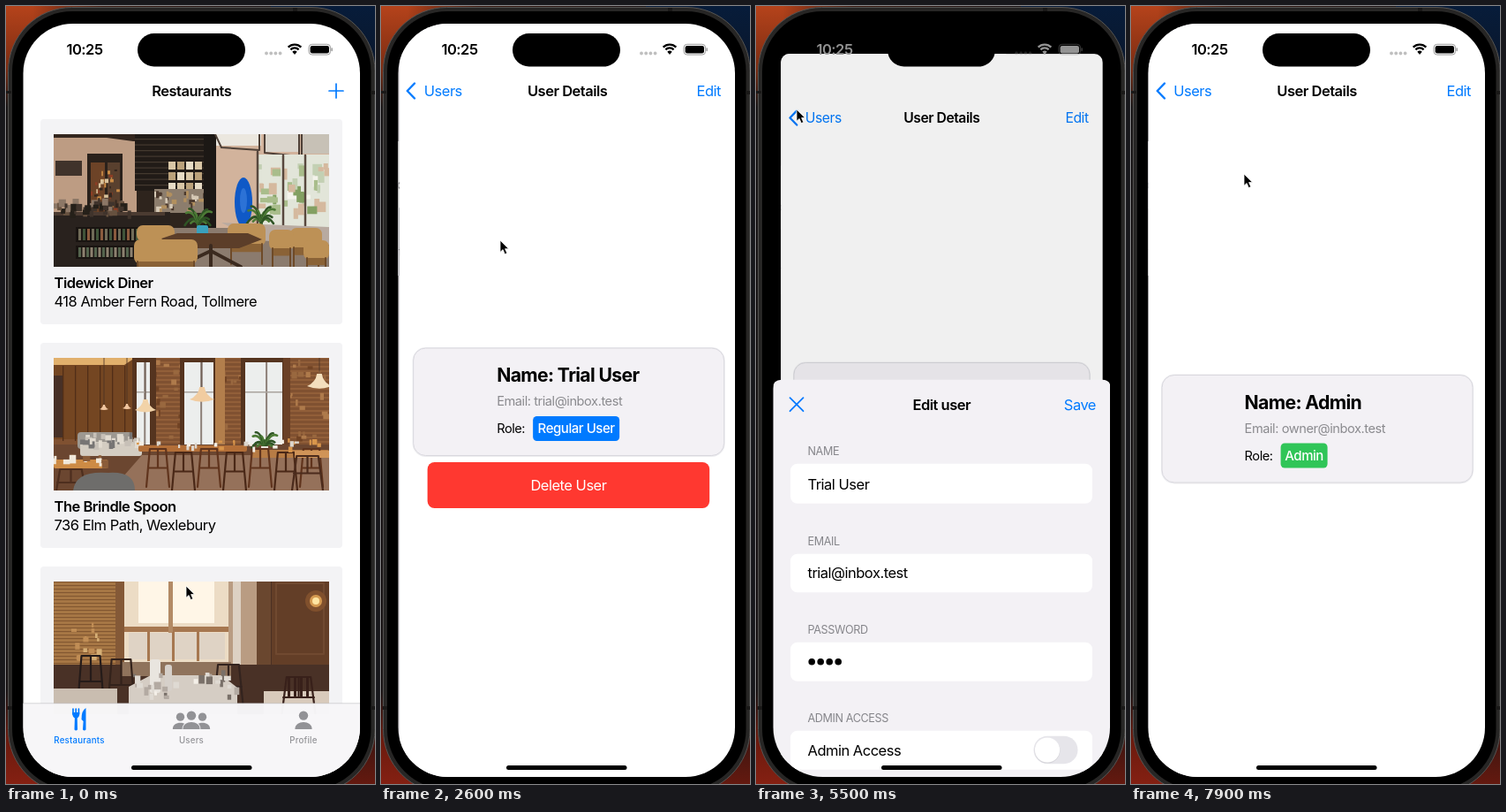
An HTML page that plays this animation: 418 by 880 pixels, repeating every 8 s.

```html
<!DOCTYPE html>
<html lang="en">
<head>
<meta charset="utf-8">
<title>Restaurant admin app</title>
<style>
  html, body { margin: 0; width: 100%; height: 100%; overflow: hidden; background: #000; }
  svg { display: block; width: 418px; height: 880px; }
  text { font-family: Inter, "Open Sans", sans-serif; letter-spacing: -0.03em; white-space: pre; }
  .tab text { letter-spacing: 0.02em; }
</style>
</head>
<body>
<svg id="stage" viewBox="0 0 418 880" xmlns="http://www.w3.org/2000/svg"></svg>
<script>
const LOOP = 8000, STEP = 100;
const BLUE = '#007aff', GRAY = '#8a8a8e', PALE = '#f3f1f5';
const GUEST = { name: 'Trial User', email: 'trial@inbox.test', role: 'Regular User' };
const ADMIN = { name: 'Admin', email: 'owner@inbox.test', role: 'Admin' };

// Markup helpers
const rect = (x, y, w, h, fill, r = 0, more = '') =>
  `<rect x="${x}" y="${y}" width="${w}" height="${h}" rx="${r}" fill="${fill}" ${more}/>`;
const circle = (x, y, r, fill) => `<circle cx="${x}" cy="${y}" r="${r}" fill="${fill}"/>`;
const oval = (x, y, rx, ry, fill) => `<ellipse cx="${x}" cy="${y}" rx="${rx}" ry="${ry}" fill="${fill}"/>`;
const shape = (d, fill) => `<path d="${d}" fill="${fill}"/>`;
const line = (d, color, w, cap = 'round') =>
  `<path d="${d}" fill="none" stroke="${color}" stroke-width="${w}" stroke-linecap="${cap}" stroke-linejoin="${cap === 'round' ? 'round' : 'miter'}"/>`;
const group = (id, body, more = '') => `<g id="${id}" ${more}>${body}</g>`;
const text = (x, y, s, { size = 16.5, weight = 400, fill = '#000', anchor = 'start' } = {}) =>
  `<text x="${x}" y="${y}" font-size="${size}" font-weight="${weight}" fill="${fill}" text-anchor="${anchor}">${s}</text>`;
const title = (s, y = 102) => text(210.3, y, s, { weight: 600, anchor: 'middle' });
const repeat = (n, f) => Array.from({ length: n }, (_, i) => f(i)).join('');

function seeded(seed) {
  return () => (seed = (seed * 16807) % 2147483647) / 2147483647;
}
function scatter(seed, n, x, y, w, h, size, colors) {
  const rnd = seeded(seed);
  return repeat(n, () => rect((x + rnd() * w).toFixed(1), (y + rnd() * h).toFixed(1),
    (size * (0.4 + rnd())).toFixed(1), (size * (0.6 + rnd())).toFixed(1), colors[Math.floor(rnd() * colors.length)]));
}

// Photos, each 312 x 150
const chair = (x, y, w, h, color) =>
  line(`M${x} ${y + h}L${x + w * 0.15} ${y}H${x + w * 0.85}L${x + w} ${y + h}M${x + 2} ${y + h * 0.5}H${x + w - 2}M${x + w / 2} ${y}V${y + h * 0.5}`, color, 2.2);
const armchair = (x, y, w, h) => rect(x, y, w, h * 0.55, '#bd9156', 7) +
  rect(x + 3, y + h * 0.5, w - 6, h * 0.2, '#8a6236', 3) +
  line(`M${x + 4} ${y + h * 0.5}V${y + h}M${x + w - 4} ${y + h * 0.5}V${y + h}`, '#6e4a28', 2);
const plant = (x, y, s) => repeat(13, i => {
  const a = Math.PI * (1 + i / 12), r = s * (0.7 + 0.3 * Math.sin(i * 5));
  return line(`M${x} ${y}Q${x + r * 0.4 * Math.cos(a)} ${y - r * 0.9} ${x + r * Math.cos(a)} ${y + r * Math.sin(a)}`, i % 2 ? '#4c7a35' : '#2f5425', 2.6);
});
const lamp = (x, y, s, color) => line(`M${x} 0V${y}`, '#473224', 0.8) +
  shape(`M${x - s * 0.2} ${y - s}H${x + s * 0.2}Q${x + s * 0.3} ${y - s * 0.3} ${x + s} ${y}Q${x} ${y + s * 0.4} ${x - s} ${y}Q${x - s * 0.3} ${y - s * 0.3} ${x - s * 0.2} ${y - s}`, color);

const cafe = () => rect(0, 0, 312, 150, '#2e241d') +
  rect(0, 0, 94, 92, '#bd9c83') + shape('M0 0H180V8H90L60 4H0Z', '#33261e') +
  rect(38, 22, 40, 72, '#2a211b') + rect(42, 32, 16, 56, '#6d4327') + rect(61, 32, 14, 56, '#59402e') +
  scatter(7, 34, 42, 34, 30, 50, 3.5, ['#c98b45', '#8c3d24', '#d9c29b', '#33261e']) +
  rect(2, 30, 30, 17, '#40332b') + rect(92, 0, 90, 64, '#211b17') +
  repeat(9, i => rect(92, 5 + i * 6.5, 88, 1.2, '#453a30')) +
  repeat(12, i => rect(130 + i % 4 * 10, 31 + Math.floor(i / 4) * 12, 8, 9, ['#d8c6a6', '#bba27b', '#e7dcc6'][i % 3])) +
  rect(114, 62, 64, 27, '#8c7d6d') + scatter(8, 35, 114, 64, 58, 20, 5, ['#d5c8b5', '#4a382c', '#b2905f']) +
  rect(0, 88, 132, 62, '#29221e') + rect(0, 88, 126, 4, '#4b3b31') + scatter(3, 45, 0, 72, 85, 16, 6, ['#40342c', '#252019', '#8c7766', '#66513f']) +
  rect(25, 105, 95, 17, '#191411') + rect(25, 126, 80, 15, '#191411') +
  repeat(17, i => rect(28 + i * 5, 107, 3, 13, ['#706b58', '#40543a', '#8a5b3e'][i % 3]) + rect(28 + i * 4.5, 128, 3, 11, ['#54634d', '#8d8170'][i % 2])) +
  rect(182, 0, 130, 110, '#d2b39c') + rect(170, 0, 14, 106, '#1c1815') +
  rect(184, 0, 51, 13, '#ebe7df') + rect(238, 0, 40, 20, '#dad5cc') + rect(281, 0, 31, 22, '#c7c1b6') +
  line('M183 0L190 15L233 18V0M239 0V21L278 25V0M281 0V25L312 28', '#4e4037', 2) +
  rect(231, 23, 81, 87, '#e2e5d9') + scatter(22, 42, 232, 32, 75, 52, 8, ['#a9bd8b', '#f4f3eb', '#c3d0b3', '#d5b99e', '#83a062']) +
  line('M231 20V105M260 24V110M285 24V110', '#58483e', 2.5) +
  shape('M120 106H312V150H100Z', '#8b7b6e') + shape('M190 100L312 105V125L230 120Z', '#b8aaa0') +
  oval(215, 77, 10, 28, '#0f59c6') + oval(215, 75, 4, 14, '#2c72d6') +
  plant(164, 103, 22) + rect(162, 103, 13, 14, '#39a1bd', 2) + plant(235, 101, 23) +
  rect(94, 103, 43, 18, '#bd9156', 7) + armchair(197, 101, 43, 46) + armchair(268, 106, 36, 44) + armchair(283, 120, 29, 40) + armchair(244, 108, 28, 42) +
  shape('M122 118L140 112H220L236 119L210 129H135Z', '#5c3e29') + line('M178 126V150M140 150L178 132L212 150', '#3b2a1f', 4) + armchair(91, 119, 72, 50);

const dining = () => rect(0, 0, 312, 150, '#805131') +
  repeat(22, i => line(`M92 ${i * 5}H312`, '#a36e43', 1.2)) + scatter(31, 100, 110, 0, 200, 92, 5, ['#99683f', '#714324', '#ae7a4b']) +
  rect(0, 0, 92, 92, '#744622') + shape('M0 0H92L80 8H0Z', '#e1b06c') + repeat(6, i => rect(10 + i * 14, 9, 1.3, 85, '#512e18')) +
  rect(0, 20, 10, 70, '#473026') +
  [[94, 15], [148, 33], [217, 42]].map(([x, w]) => rect(x - 5, 0, w + 12, 103, '#55341f') + rect(x, 5, w, 94, '#eceeed') +
    rect(x + w * 0.55, 5, 2, 94, '#8d8078') + rect(x, 38, w, 1.5, '#aaa49e')).join('') +
  rect(183, 0, 11, 105, '#b27e4c') + rect(260, 0, 8, 105, '#6a4026') +
  shape('M0 98H312V150H0Z', '#6b4630') + shape('M100 110H312V150H65Z', '#95715a') +
  rect(27, 84, 62, 19, '#9d9891', 4) + rect(30, 95, 70, 16, '#d4cdc2', 3) +
  scatter(5, 30, 30, 84, 65, 13, 6, ['#c7c0b7', '#777574', '#e2dbd0']) +
  lamp(57, 58, 5, '#f1c6a0') + lamp(83, 57, 5, '#f1c6a0') + lamp(104, 59, 12, '#f2d3a8') + lamp(168, 47, 14, '#f1cca0') + lamp(301, 32, 14, '#f4dfbd') +
  plant(239, 102, 21) + rect(235, 100, 8, 9, '#e7e2d9') +
  rect(96, 99, 123, 7, '#b36f38', 2) + rect(224, 104, 88, 9, '#b77c45', 2) +
  repeat(7, i => chair(105 + i * 29, 103 + i % 2 * 4, 26, 43, i % 2 ? '#4a2817' : '#60341d')) +
  scatter(11, 28, 94, 91, 215, 10, 4, ['#f3eee5', '#ddd6cd', '#d9964b']) +
  rect(0, 115, 61, 10, '#cd8b45', 2) + scatter(12, 12, 0, 109, 55, 8, 6, ['#f1e8da', '#8a5c39']) +
  chair(2, 126, 35, 30, '#4d2e1e') + shape('M22 150Q25 127 62 130Q92 128 92 150Z', '#6e6d6b') +
  rect(273, 105, 39, 8, '#d09458') + chair(270, 111, 35, 39, '#4b2b1c');

const bistro = () => rect(0, 0, 312, 150, '#4b3023') +
  rect(0, 0, 72, 108, '#a77745') + repeat(27, i => rect(0, i * 4, 72, 1.1, '#815630')) + scatter(9, 14, 20, 45, 30, 45, 5, ['#d5ae75', '#c08d55']) +
  rect(70, 0, 10, 118, '#845937') + rect(80, 0, 118, 92, '#ecdcc5') + rect(96, 0, 86, 47, '#fff6e7') +
  rect(80, 51, 118, 6, '#a67750') + rect(130, 0, 5, 88, '#b38a65') + rect(85, 58, 109, 30, '#dfd3c5') +
  repeat(3, i => rect(106 + i * 28, 57, 3, 33, '#a67750')) +
  rect(198, 0, 32, 125, '#b99c82') + rect(203, 0, 9, 125, '#ddd1c3') + rect(230, 0, 16, 118, '#6a472f') +
  rect(247, 0, 65, 108, '#633e27') + line('M252 2H306V82H252Z', '#704930', 2) +
  circle(297, 22, 12, '#80502d') + circle(297, 22, 7, '#d59a50') + circle(297, 22, 4, '#ffe5a2') +
  rect(0, 94, 312, 56, '#493126') + rect(77, 91, 124, 16, '#8f735c') +
  chair(27, 84, 30, 58, '#251b19') + chair(61, 88, 31, 58, '#33221b') + chair(181, 94, 34, 50, '#33231e') +
  shape('M85 119L110 106H190L208 120V150H85Z', '#d5cdc4') + rect(0, 121, 72, 29, '#c9bdb0') + rect(238, 124, 74, 26, '#d8cabb') +
  chair(258, 108, 39, 46, '#38201a') + repeat(4, i => rect(265 + i * 7, 109, 3, 22, '#38201a')) +
  rect(109, 88, 12, 38, '#e9e5df', 3) + rect(126, 94, 8, 30, '#d6d0ca', 3) +
  scatter(24, 30, 90, 100, 115, 29, 6, ['#f4efe8', '#b3aaa2', '#dfdad3', '#797069']);

const photo = (y, art) => `<svg x="54" y="${y}" width="312" height="150" viewBox="0 0 312 150">${art()}</svg>`;
const card = (y, art, name, address) => rect(39, y, 342, 232, '#f3f3f5', 4) + photo(y + 17, art) +
  text(54.5, y + 191, name, { weight: 600 }) + text(54.5, y + 212, address);

// Tab bar
const person = (x, s, c) => circle(x, 818 - 15.4 * s, 5.2 * s, c) +
  shape(`M${x - 9.6 * s} 818C${x - 10 * s} ${818 - 10.8 * s} ${x + 10 * s} ${818 - 10.8 * s} ${x + 9.6 * s} 818Z`, c);
const cutlery = c => line('M76 795V801M79.2 795V818M82.4 795V801', c, 1.7) +
  shape('M75.2 799H83.3Q83.5 804 80.7 805.5L81 818.5Q79.2 820.5 77.5 818.5L77.9 805.5Q75 804 75.2 799Z', c) +
  shape('M90.5 794V818.5Q88.8 820.5 87 818.5L87.6 809L85.5 807Q85.3 797 90.5 794Z', c);
function tabs(active) {
  const color = i => i === active ? BLUE : '#929296';
  const label = (x, s, i) => text(x, 834, s, { size: 9.7, weight: 500, fill: color(i), anchor: 'middle' });
  return `<g class="tab">${cutlery(color(0))}${person(197.5, 0.9, color(1))}${person(222.5, 0.9, color(1))}` +
    `<g stroke="#f4f3f7" stroke-width="1.6" paint-order="stroke">${person(210, 1, color(1))}</g>${person(337, 1, color(2))}` +
    label(83, 'Restaurants', 0) + label(210, 'Users', 1) + label(337, 'Profile', 2) + '</g>';
}

// Screens
const plus = line('M366 96H382M374 88V104', BLUE, 1.7);
const restaurants = rect(19, 20, 383, 853, '#fff') +
  card(128, cafe, 'Tidewick Diner', '418 Amber Fern Road, Tollmere') +
  card(381, dining, 'The Brindle Spoon', '736 Elm Path, Wexlebury') +
  card(634, bistro, '', '') +
  rect(19, 789, 383, 84, '#f7f6f8', 0, 'fill-opacity=".98"') + rect(19, 788.5, 383, 0.7, '#c4c4c6') +
  tabs(0) + title('Restaurants') + plus;

const userRow = (y, { name, email }) => text(58.5, y + 35, name, { weight: 600 }) +
  text(58.5, y + 53.5, email, { size: 14.5, fill: GRAY }) +
  line(`M355.5 ${y + 32.5}L360.8 ${y + 38}L355.5 ${y + 43.5}`, '#bfbfc3', 1.9);
const users = rect(19, 20, 383, 853, PALE) + rect(39, 153, 342, 152, '#fff', 9) +
  rect(39, 153, 342, 76, '#d1d1d6', 9, 'id="pressAdmin"') + rect(39, 229, 342, 76, '#d1d1d6', 9, 'id="pressGuest"') +
  rect(58, 228, 323, 0.8, '#d4d4d8') + userRow(153, ADMIN) + userRow(229, GUEST) +
  rect(299, 180, 45.5, 22, BLUE, 4) + text(321.7, 195.3, 'Admin', { size: 12.3, weight: 600, fill: '#fff', anchor: 'middle' }) +
  tabs(1) + rect(19, 20, 383, 853, '#000', 0, 'id="shade"');

const details = (user, x, y, pillW, color) => rect(19, 20, 383, 853, '#fff') +
  rect(33.5, y - 0.5, 354, 124, '#ededf0', 15) + rect(34.5, y + 0.5, 352, 121.5, PALE, 14, 'stroke="#d9d8de"') +
  text(x, y + 38.5, `Name: ${user.name}`, { size: 21.2, weight: 700 }) +
  text(x, y + 65.5, `Email: ${user.email}`, { size: 14.6, fill: GRAY }) +
  text(x, y + 96.8, 'Role:', { size: 14.6 }) +
  rect(x + 41, y + 77.5, pillW, 28, color, 4.5) +
  text(x + 41 + pillW / 2, y + 96.8, user.role, { size: 15, weight: 500, fill: '#fff', anchor: 'middle' });
const guestDetails = details(GUEST, 129, 386.5, 98, BLUE) + rect(50.5, 516, 319.5, 52, '#ff3830', 8) +
  text(210.3, 548.3, 'Delete User', { fill: '#fff', anchor: 'middle' });

const detailsNav = line('M38 87.5L29.8 96L38 104.5', BLUE, 2.4) +
  group('backLabel', text(48, 102, 'Users', { fill: BLUE })) +
  group('detailsTitle', title('User Details')) + text(385, 102, 'Edit', { fill: BLUE, anchor: 'end' });

const field = (label, y, h, body) => text(58.5, y - 10, label, { size: 12.6, fill: '#85858a' }) +
  rect(39, y, 342, h, '#fff', 8) + body;
const sheet = shape('M19 873V99Q19 89 29 89H392Q402 89 402 99V873Z', PALE) +
  line('M38.5 109.5L53.5 124.5M53.5 109.5L38.5 124.5', BLUE, 1.8) +
  title('Edit user', 123) + text(385, 123, 'Save', { fill: BLUE, anchor: 'end' }) +
  field('NAME', 184, 45, text(58.5, 213.5, GUEST.name)) +
  field('EMAIL', 286, 43.5, text(58.5, 313.5, GUEST.email)) +
  field('PASSWORD', 386, 44, repeat(4, i => circle(63.2 + i * 10, 408, 3.8, '#000'))) +
  field('ADMIN ACCESS', 486, 44, text(58.5, 514, 'Admin Access') +
    rect(314.5, 492, 50, 31.5, '#e6e5ea', 15.7) + circle(330, 508.5, 14.4, '#d6d5da') + circle(330, 507.8, 14.1, '#fff'));

const arc = r => line(`M${327 - r * 0.72} ${54 - r * 0.72}A${r} ${r} 0 0 1 ${327 + r * 0.72} ${54 - r * 0.72}`, 'currentColor', 2.3, 'butt');
const status = text(89, 55.3, '10:25', { weight: 600, fill: 'currentColor', anchor: 'middle' }) +
  `<g opacity=".25">${repeat(4, i => circle(295 + i * 5.2, 53.5, 1.9, 'currentColor'))}</g>` +
  arc(10.2) + arc(6.4) + shape('M327 55L324.3 51.8A3.8 3.8 0 0 1 329.7 51.8Z', 'currentColor') +
  `<g opacity=".4">${rect(343, 43.3, 24.6, 11.8, 'none', 3.8, 'stroke="currentColor"')}${rect(368.4, 47.2, 1.5, 4, 'currentColor', 0.7)}</g>` +
  rect(344.6, 44.9, 21.4, 8.6, 'currentColor', 2.3);

document.getElementById('stage').innerHTML = `
<defs>
  <linearGradient id="left" x2="0" y2="1"><stop offset="0" stop-color="#b5431b"/><stop offset=".08" stop-color="#7c2c12"/>
    <stop offset=".13" stop-color="#171415"/><stop offset=".88" stop-color="#171213"/><stop offset=".94" stop-color="#6a1a0e"/><stop offset="1" stop-color="#842012"/></linearGradient>
  <linearGradient id="right" x2="0" y2="1"><stop offset="0" stop-color="#071c3a"/><stop offset=".12" stop-color="#0b1424"/>
    <stop offset=".88" stop-color="#171213"/><stop offset="1" stop-color="#64190f"/></linearGradient>
  <linearGradient id="top"><stop offset="0" stop-color="#3a1a12" stop-opacity="0"/><stop offset=".3" stop-color="#3a1a12"/>
    <stop offset="1" stop-color="#1c1517"/></linearGradient>
  <clipPath id="screen"><rect x="19.5" y="20" width="381.5" height="852" rx="56"/></clipPath>
  <clipPath id="window"><rect x="19" y="20" width="383" height="860" rx="10"/></clipPath>
</defs>` +
  rect(0, 0, 300, 880, 'url(#left)') + rect(300, 0, 118, 880, 'url(#right)') + rect(30, 0, 270, 30, 'url(#top)') +
  rect(2.5, 1.5, 415.5, 889, '#272625', 72, 'stroke="#555452"') + rect(7, 6, 406.5, 880, '#000', 68) +
  rect(0, 96, 6, 3, '#1a1918') + rect(2, 792, 5, 4, '#1a1918') + rect(413, 96, 5, 4, '#1a1918') + rect(413, 792, 5, 4, '#1a1918') + rect(325, 2, 5, 4, '#1a1918') +
  `<g clip-path="url(#screen)">` + rect(19, 20, 383, 853, '#000') +
  group('base',
    group('restaurants', restaurants) + group('users', users) +
    group('guest', guestDetails) + group('admin', details(ADMIN, 128, 417, 53, '#30c558')) +
    group('usersNav', group('usersTitle', title('Users')) + plus) + group('detailsNav', detailsNav) +
    rect(19, 20, 383, 860, '#000', 0, 'id="dim"'), 'clip-path="url(#window)"') +
  group('sheet', sheet) + rect(149, 31, 122, 37.5, '#000', 18.7) + group('status', status) +
  rect(142, 859, 136.5, 5, '#000', 2.5) + '</g>' +
  group('cursor', `<path d="M0 0V13.3L3.1 10.5L5.3 15.6L7.8 14.5L5.6 9.6H9.7Z" fill="#000" stroke="#fff" stroke-width=".8"/>`);

const el = id => document.getElementById(id);
const move = (id, x, y = 0) => el(id).setAttribute('transform', `translate(${x.toFixed(2)} ${y.toFixed(2)})`);
const fade = (id, value) => el(id).setAttribute('opacity', Math.max(0, Math.min(1, value)).toFixed(3));
const show = (id, visible) => { el(id).style.display = visible ? '' : 'none'; };

const TAB = 900, OPEN_GUEST = 2100, EDIT = 3560, CLOSE = 5420, BACK = 6150, OPEN_ADMIN = 7300;

// Critically damped spring from 0 to 1
function spring(ms, speed) {
  const a = Math.max(0, ms) * speed / 1000;
  return 1 - (1 + a) * Math.exp(-a);
}

// Pointer stops: time, x, y
const STOPS = [[0, 204, 656], [150, 204, 656], [750, 200.5, 803], [1400, 200.5, 803], [2000, 135, 266], [2750, 135, 265],
  [3350, 369, 98], [4010, 369, 98], [4620, 46, 117], [5600, 46, 117], [5900, 57, 112], [6080, 58, 93], [6400, 58, 93], [7000, 128, 190], [LOOP, 128, 190]];
function pointer(t) {
  const i = STOPS.findIndex(s => s[0] > t);
  const [t0, x0, y0] = STOPS[i - 1], [t1, x1, y1] = STOPS[i];
  const k = (t - t0) / (t1 - t0), e = k * k * (3 - 2 * k);
  return [x0 + (x1 - x0) * e, y0 + (y1 - y0) * e];
}

function render(t) {
  const push = spring(t - OPEN_GUEST, 14.6) - spring(t - BACK, 14.6) + spring(t - OPEN_ADMIN, 14.6);
  const modal = spring(t - EDIT, 18) - spring(t - CLOSE, 18);
  const onUsers = t >= TAB, isAdmin = t >= OPEN_ADMIN - 100;
  const pressed = t < BACK || isAdmin ? (push > 0.005 ? 1 : 0) : push;

  show('restaurants', !onUsers);
  show('users', onUsers);
  show('guest', !isAdmin && push > 0.001);
  show('admin', isAdmin && push > 0.001);
  show('usersNav', onUsers);

  move('users', -115 * push);
  fade('shade', 0.1 * push);
  fade('pressGuest', isAdmin ? 0 : pressed);
  fade('pressAdmin', isAdmin ? pressed : 0);
  const offset = 382 * (1 - push);
  move('guest', offset);
  move('admin', offset);

  fade('usersNav', 1 - push * 1.6);
  move('usersTitle', -140 * push);
  fade('detailsNav', push * 1.6 - 0.6);
  move('backLabel', 140 * (1 - push));
  move('detailsTitle', 160 * (1 - push));

  const scale = 1 - 0.083 * modal;
  el('base').setAttribute('transform', `translate(${210.3 * (1 - scale)} ${20 + 59 * modal - 20 * scale}) scale(${scale})`);
  fade('dim', 0.1 * modal);
  show('sheet', modal > 0.001);
  move('sheet', 0, 791 * (1 - modal));
  const tone = Math.round(255 * modal);
  el('status').style.color = `rgb(${tone},${tone},${tone})`;
  move('cursor', ...pointer(t));
}

const start = performance.now();
function tick() {
  const t = (performance.now() - start) % LOOP;
  render(Math.floor(t / STEP) * STEP);
  requestAnimationFrame(tick);
}
tick();
</script>
</body>
</html>
```
